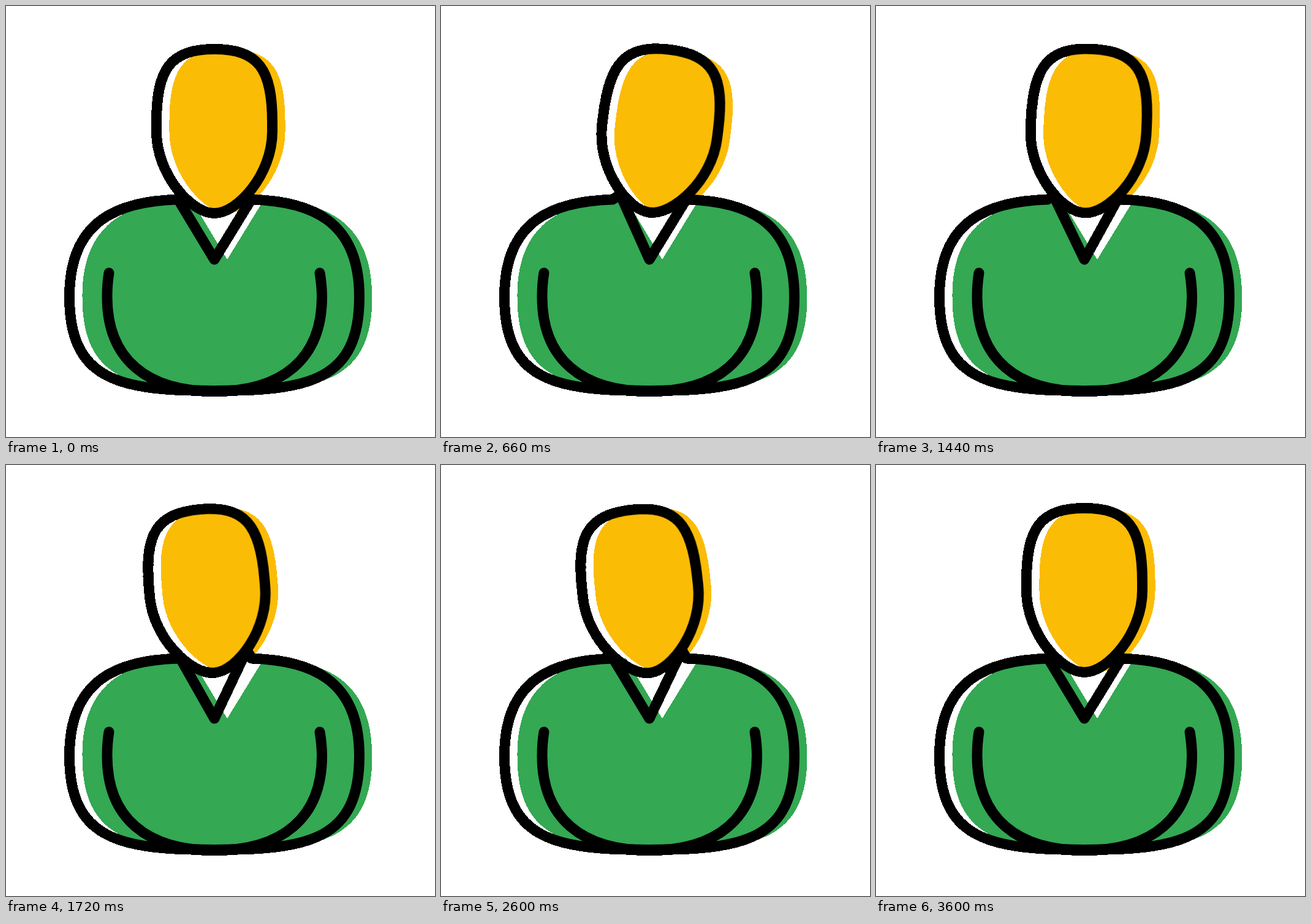
Animation, 700 px wide and 704 px high, one loop 3.62 s. Source, as an HTML page:

```html
<!DOCTYPE html>
<html lang="en">
<head>
<meta charset="utf-8">
<title>Person</title>
<style>
  html, body { margin: 0; width: 100%; height: 100%; overflow: hidden; background: #fff; }
  svg { display: block; width: 700px; height: 704px; }
  .line { fill: none; stroke: #000; stroke-width: 17; stroke-linecap: round; stroke-linejoin: round; }
  .head { transform-origin: 350.5px 338.5px; }
</style>
</head>
<body>
<svg viewBox="0 0 700 704">
  <!-- Hard outer edge, smooth inner edges -->
  <filter id="cut" filterUnits="userSpaceOnUse" x="0" y="0" width="700" height="704" color-interpolation-filters="sRGB">
    <feComponentTransfer><feFuncA type="discrete" tableValues="0 1"/></feComponentTransfer>
  </filter>
  <g filter="url(#cut)">
    <g class="head"><path class="face" fill="#fbbc05" transform="translate(21 0)"/></g>
    <path id="shirt" fill="#34a853" transform="translate(21 0)"/>
    <path id="body" class="line"/>
    <path class="line" d="M168 436C166 448 165 460 165 475C165 577 230 629.5 340 629.5C450 629.5 515.5 577 515.5 475C515.5 460 514 448 512 436"/>
    <g class="head"><path class="face line"/></g>
  </g>
</svg>
<script>
  const face = 'M340 70.5C268 70.5 245.5 103 245.5 190V205C245.5 275 302 338.5 340 338.5' +
    'C378 338.5 434.5 275 434.5 205V190C434.5 103 412 70.5 340 70.5Z';

  // Torso outline; the two collar corners follow the neck.
  const torso = ({ left, right }) =>
    `M280 316L${left}L340 414L${right}L401 316` +
    'C495 319 576.5 348 576.5 475C576.5 612 495 628.5 340 628.5' +
    'C185 628.5 103.5 612 103.5 475C103.5 348 185 319 280 316Z';

  const loop = 3620;
  const rest = { angle: 0, left: '281 316', right: '400 316' };
  const poses = [
    { ...rest, at: 0 },
    { ...rest, at: 1188, angle: 8, left: '294 307' },
    { ...rest, at: 2376, angle: -8, right: '391 299' },
    { ...rest, at: 3600 },
    { ...rest, at: loop }
  ];

  const $ = id => document.getElementById(id);
  const play = (el, style) => el.animate(
    poses.map(p => ({ offset: p.at / loop, easing: 'cubic-bezier(.33,0,.05,1)', ...style(p) })),
    { duration: loop, iterations: Infinity }
  );

  document.querySelectorAll('.face').forEach(el => el.setAttribute('d', face));
  $('shirt').setAttribute('d', torso(rest));
  $('body').setAttribute('d', torso(rest));

  document.querySelectorAll('.head').forEach(el => play(el, p => ({ transform: `rotate(${p.angle}deg)` })));
  play($('body'), p => ({ d: `path("${torso(p)}")` }));
</script>
</body>
</html>
```
